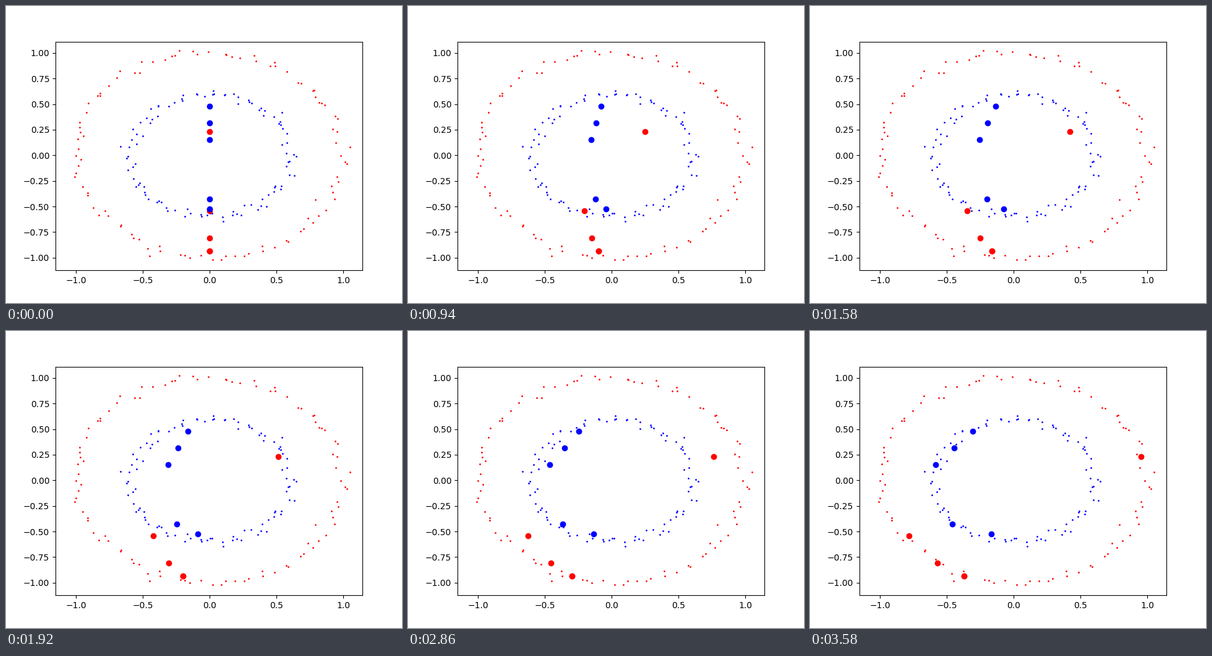
Animation of 640 by 480 pixels, one loop 3600 ms. Source, as a matplotlib script:

```python
import numpy as np
import matplotlib.pyplot as plt
from matplotlib.animation import FuncAnimation

FRAMES = 180
PER_RING = 100
NOISE = 0.03

# Ring samples that slide in sideways from x = 0. They were picked with
# replacement, so one red sample appears twice.
RED_PICKS = [(.953, .23), (-.784, -.543), (-.569, -.81),
             (-.369, -.936), (-.369, -.936)]
BLUE_PICKS = [(-.306, .478), (-.444, .315), (-.583, .153),
              (-.458, -.427), (-.167, -.524)]


def noisy_ring(radius, picks, rng):
    """Evenly spaced ring with noise; each pick replaces its nearest sample."""
    angles = np.arange(PER_RING) * 2 * np.pi / PER_RING
    ring = radius * np.column_stack([np.cos(angles), np.sin(angles)])
    ring += rng.normal(0, NOISE, ring.shape)
    for pick in picks:
        nearest = np.argmin(np.hypot(*(ring - pick).T))
        ring[nearest] = pick
    return ring


fig, ax = plt.subplots(figsize=(6.4, 4.8), dpi=100)
fig.subplots_adjust(left=0.125, right=0.9, bottom=0.11, top=0.88)
ax.set_xlim(-1.1532, 1.1421)
ax.set_ylim(-1.124, 1.111)

rng = np.random.default_rng(4)
movers = []
for color, radius, picks in [("red", 1.0, RED_PICKS),
                             ("blue", 0.6, BLUE_PICKS)]:
    ring = noisy_ring(radius, picks, rng)
    ax.plot(*ring.T, "o", color=color, markersize=1)
    end_x, y = np.array(picks).T
    line, = ax.plot(0 * end_x, y, "o", color=color, zorder=3)
    movers.append((line, end_x))


def update(frame):
    for line, end_x in movers:
        line.set_xdata(end_x * frame / (FRAMES - 1))
    return [line for line, _ in movers]


anim = FuncAnimation(fig, update, frames=FRAMES, interval=20, repeat=True,
                     repeat_delay=0)
plt.show()
```
